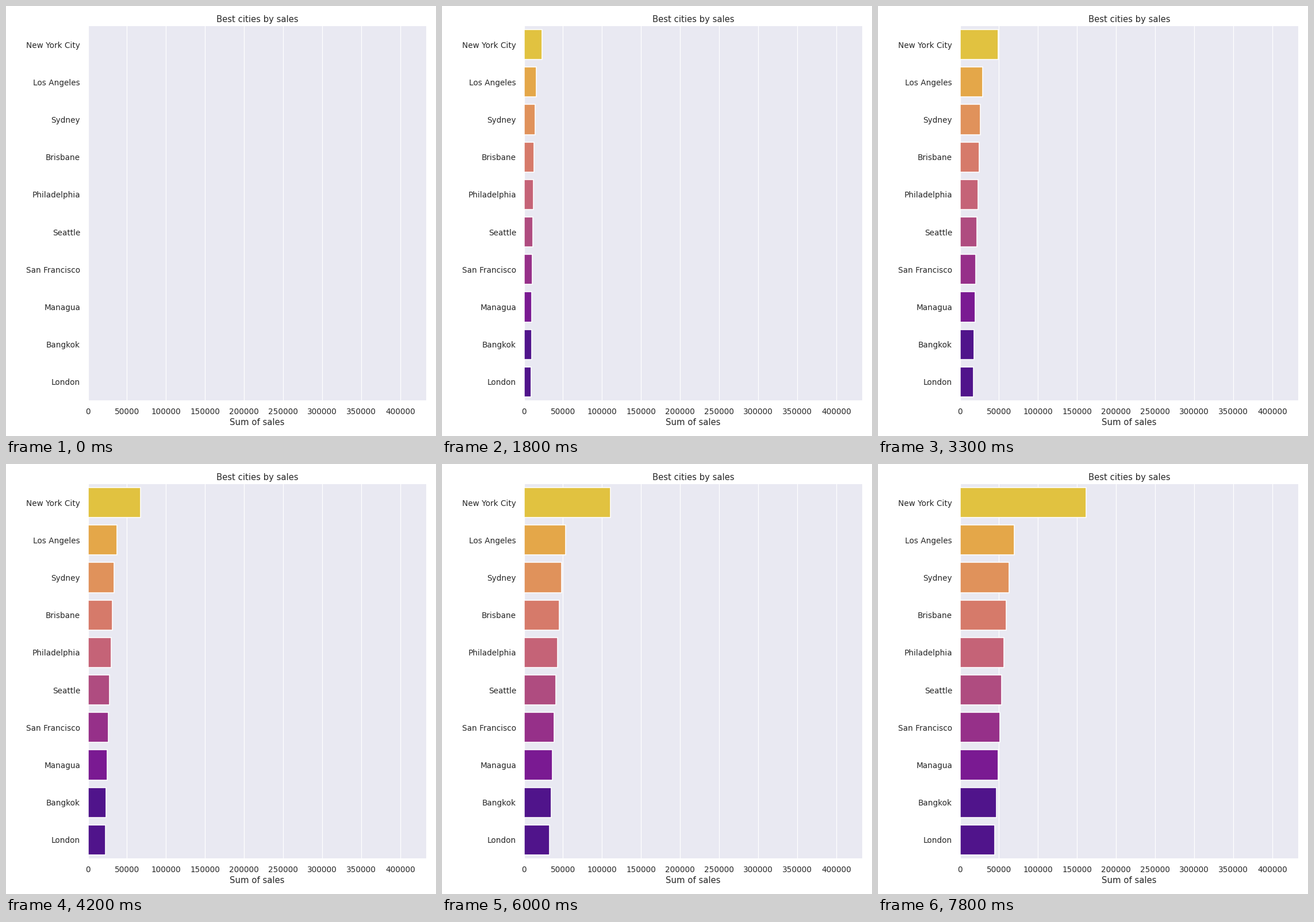
Write a matplotlib script that moves like this. It is 748 px wide and 748 px high and loops after 8000 ms.

```python
import numpy as np
import matplotlib.pyplot as plt
from matplotlib.animation import FuncAnimation

SIZE, DPI = 748, 90
LEFT, RIGHT, TOP, BOTTOM = 142.5, 731, 35.5, 685.5
INK = "#262626"
FRAME_MS, STEP_MS, LOOP_MS = 100, 300, 8000

CITIES = ["New York City", "Los Angeles", "Sydney", "Brisbane", "Philadelphia",
          "Seattle", "San Francisco", "Managua", "Bangkok", "London"]
COLORS = ["#e1c240", "#e4a749", "#e0925b", "#d67a6a", "#c56377",
          "#af4c80", "#963089", "#7a1a92", "#50148b", "#50148b"]
COUNT = len(CITIES)


def sales_at(step):
    """Running totals: an accelerating leader and a steadily spreading pack."""
    leader = 3180 * step + 117 * step**2
    second = 2670 * step
    last = 1450 * step + 10 * step**2
    rank = np.linspace(0, 1, COUNT - 1) ** 0.66
    return np.append(leader, second + (last - second) * rank)


plt.rcParams["font.family"] = "DejaVu Sans"
fig = plt.figure(figsize=(SIZE / DPI, SIZE / DPI), dpi=DPI, facecolor="white")
ax = fig.add_axes([LEFT / SIZE, 1 - BOTTOM / SIZE,
                   (RIGHT - LEFT) / SIZE, (BOTTOM - TOP) / SIZE],
                  facecolor="#e9e9f2")
ax.spines[:].set_visible(False)
ax.set_axisbelow(True)
ax.grid(axis="x", color="white", linewidth=1)

bars = ax.barh(range(COUNT), np.zeros(COUNT), height=0.8, color=COLORS,
               edgecolor="white", linewidth=1.25)
ax.set_xlim(0, 433000)
ax.set_ylim(COUNT - 0.515, -0.485)
ax.set_xticks(range(0, 400001, 50000))
ax.set_yticks(range(COUNT), CITIES)
ax.tick_params(length=0, labelsize=10.9, labelcolor=INK, pad=10.8)
ax.set_title("Best cities by sales", fontsize=11.9, color=INK)
ax.set_xlabel("Sum of sales", fontsize=11.9, color=INK, labelpad=3)


def update(frame):
    step = frame * FRAME_MS // STEP_MS
    for bar, total in zip(bars, sales_at(step)):
        bar.set_width(total)
        bar.set_visible(step > 0)
    return bars


anim = FuncAnimation(fig, update, frames=LOOP_MS // FRAME_MS,
                     interval=FRAME_MS, repeat=True, repeat_delay=0)
plt.show()
```
